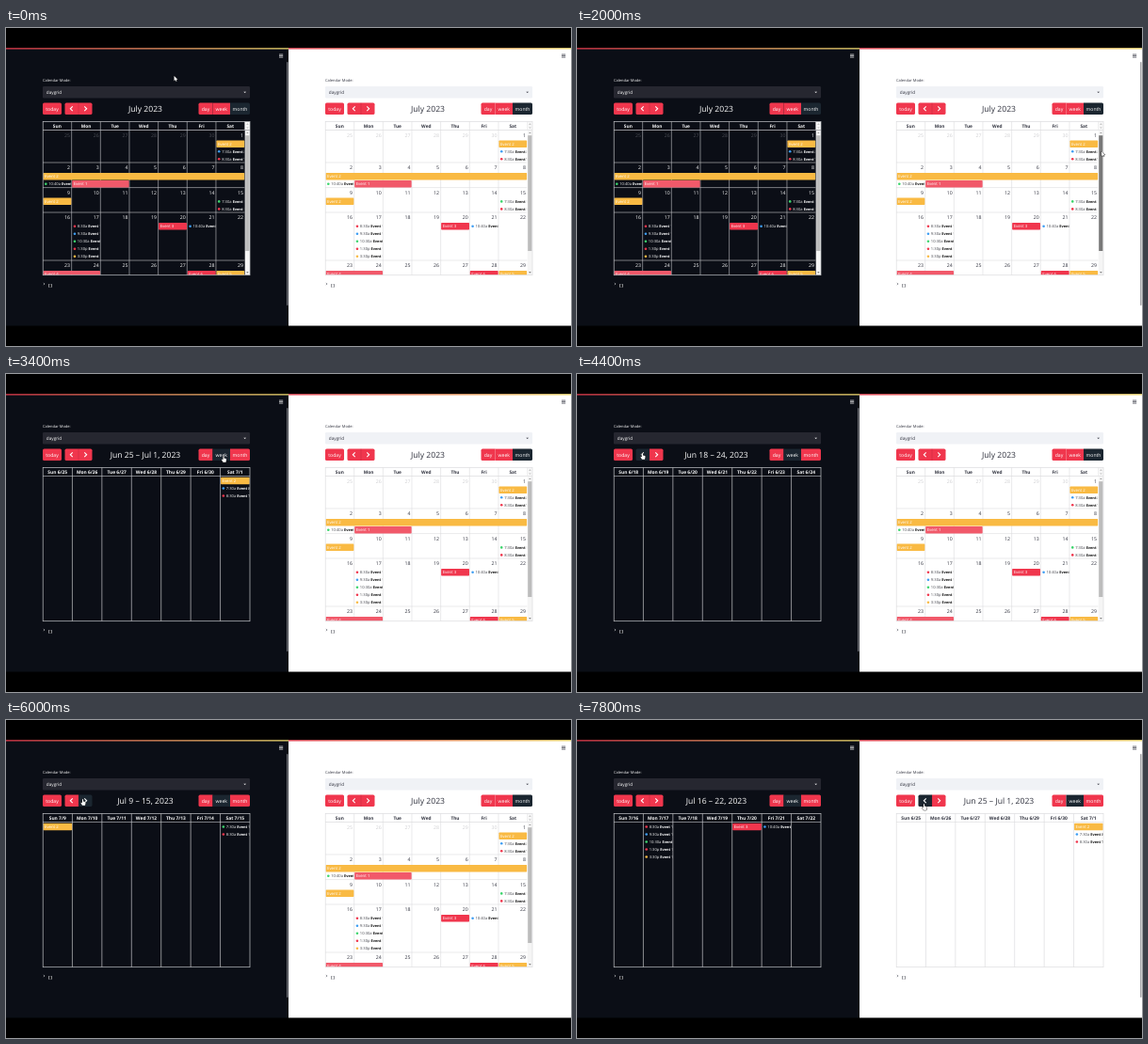
Write an HTML page with a canvas that moves like this. It is 600 px wide and 338 px high and loops after 8000 ms.

```html
<!DOCTYPE html>
<html lang="en">
<head>
<meta charset="utf-8">
<title>Calendar in two themes</title>
<style>
html, body { margin: 0; width: 100%; height: 100%; overflow: hidden; background: #000; }
canvas { display: block; width: 600px; height: 338px; }
</style>
</head>
<body>
<canvas id="stage"></canvas>
<script>
const LOOP = 8000, STEP = 200;
const canvas = document.getElementById('stage');
const dpr = window.devicePixelRatio || 1;
canvas.width = 600 * dpr;
canvas.height = 338 * dpr;
const ctx = canvas.getContext('2d');
ctx.scale(dpr, dpr);
ctx.textRendering = 'geometricPrecision';

const SANS = '"Open Sans", "Noto Sans", sans-serif';
const MONO = '"Noto Sans Mono", monospace';
const RED = '#f0364d', PINK = '#f1596a', GOLD = '#f9ba43';
const BLUE = '#3d9df3', GREEN = '#3dd56d', NAVY = '#1b2630';
const THEMES = [
  { bg: '#0b0e16', text: '#fafafa', time: '#f0f0f0', dim: '#4b4d54', line: '#c4c5c8', field: '#262730', bar: '#6c6e73' },
  { bg: '#fff', text: '#31333f', time: '#45464d', dim: '#cfcfd2', line: '#dcdcde', field: '#f0f2f6', bar: '#a9a9ac' }
];

// Events by week, counted from June 25; bars: slot, first day, days, colour, number.
const BARS = [
  [[0, 6, 1, GOLD, 2]],
  [[0, 0, 7, GOLD, 2], [1, 1, 2, PINK, 1]],
  [[0, 0, 1, GOLD, 2]],
  [[0, 4, 1, RED, 3]],
  [[0, 0, 2, PINK, 4], [0, 5, 1, RED, 6], [0, 6, 1, GOLD, 5]],
  []
];
// Timed entries: slot, day, colour, time, number.
const TIMED = [
  [[1, 6, BLUE, '7:30a', 8], [2, 6, RED, '8:30a', 7]],
  [[1, 0, GREEN, '10:40a', 9]],
  [[0, 6, GREEN, '7:30a', 10], [1, 6, RED, '8:30a', 11]],
  [[0, 1, RED, '8:30a', 12], [1, 1, BLUE, '9:30a', 13], [2, 1, GREEN, '10:30a', 14],
   [3, 1, RED, '1:30p', 15], [4, 1, GOLD, '3:30p', 16], [0, 5, BLUE, '10:40a', 17]],
  [], []
];
const ROWS = [108.5, 143, 169.6, 196, 247, 273.5, 290];
const DAYS = ['Sun', 'Mon', 'Tue', 'Wed', 'Thu', 'Fri', 'Sat'];
const BUTTONS = {
  today: [39, 20], prev: [62.5, 14.5], next: [77, 14.5],
  day: [204.5, 15], week: [219.5, 18.5], month: [238, 21]
};

// Time, x, y of the pointer's hot spot.
const POINTER = [
  [0, 178.6, 51], [1000, 257, 117], [1200, 257, 126], [1400, 257, 137], [1600, 257, 117],
  [1800, 330, 112], [2000, 557, 131], [2200, 558, 151], [2600, 559.5, 131],
  [2800, 450, 112], [3200, 231, 87], [3600, 231, 87], [4000, 69.5, 84], [4800, 69.5, 84],
  [5000, 81.5, 84], [6200, 81.5, 84], [6800, 528, 87], [7200, 528, 87], [7800, 368.5, 89]
];
// Week shown from each time on; null is the month.
const VIEWS = [
  [[0, null], [3400, 0], [4400, -1], [5400, 0], [5600, 1], [5800, 2], [6200, 3]],
  [[0, null], [7000, 0]]
];
const DRAGS = [[1000, 1600, 117], [2000, 2600, 131]];

const clamp = (v, a, b) => Math.min(b, Math.max(a, v));
const dateOf = (week, day) => new Date(Date.UTC(2023, 5, 25 + week * 7 + day));

function pointerAt(t) {
  const i = POINTER.findLastIndex(p => p[0] <= t);
  const a = POINTER[i], b = POINTER[i + 1] || a;
  const k = b === a ? 0 : (t - a[0]) / (b[0] - a[0]);
  const e = k * k * (3 - 2 * k);
  return [a[1] + (b[1] - a[1]) * e, a[2] + (b[2] - a[2]) * e];
}

function rect(x, y, w, h, fill, r = 0) {
  ctx.fillStyle = fill;
  ctx.beginPath();
  ctx.roundRect(x, y, w, h, r);
  ctx.fill();
}

function line(color, width, ...pts) {
  ctx.strokeStyle = color;
  ctx.lineWidth = width;
  ctx.beginPath();
  pts.forEach(([x, y]) => ctx.lineTo(x, y));
  ctx.stroke();
}

function text(s, x, y, size, color, { weight = 400, align = 'left', family = SANS } = {}) {
  ctx.font = `${weight} ${size}px ${family}`;
  ctx.textAlign = align;
  ctx.fillStyle = color;
  ctx.fillText(s, x, y);
  return ctx.measureText(s).width;
}

function clipped(x, y, w, h, draw) {
  ctx.save();
  ctx.beginPath();
  ctx.rect(x, y, w, h);
  ctx.clip();
  draw();
  ctx.restore();
}

function triangle(x, y, dir, color, s = 1.3) {
  ctx.fillStyle = color;
  ctx.beginPath();
  ctx.moveTo(x - s, y - dir * s / 2);
  ctx.lineTo(x + s, y - dir * s / 2);
  ctx.lineTo(x, y + dir * s / 2);
  ctx.fill();
}

function drawEvents(theme, week, top, colW) {
  for (const [slot, day, span, color, n] of BARS[week] || []) {
    const x = 39 + day * colW, y = top + slot * 8;
    rect(x + 0.5, y, colW * span - 0.8, 7.5, color, 0.8);
    text('Event ' + n, x + 2, y + 5.3, 4.3, '#fff');
  }
  for (const [slot, day, color, time, n] of TIMED[week] || []) {
    const x = 39 + day * colW, y = top + slot * 8 + 3.8;
    clipped(x, y - 4, colW - 0.5, 8, () => {
      rect(x + 2, y - 1.3, 2.6, 2.6, color, 1.3);
      const w = text(time, x + 6.2, y + 1.5, 4.1, theme.time);
      text('Event ' + n, x + 7.3 + w, y + 1.5, 3.9, theme.text === '#fafafa' ? '#fff' : '#111', { weight: 700 });
    });
  }
}

function drawScrollbar(offset, active) {
  rect(253.7, 99.7, 5.3, 8.6, '#f8f8f8');
  triangle(256.4, 102, -1, '#b5b5b5');
  triangle(256.4, 106.2, 1, '#b5b5b5');
  rect(253.7, 108.8, 5.3, 153.7, '#f5f5f5');
  triangle(256.4, 111.3, -1, '#999');
  triangle(256.4, 259.8, 1, '#555');
  rect(254.2, 114.2 + offset, 4.3, 122.8, active ? '#787878' : '#bcbcbc');
}

function drawMonth(theme, offset, active) {
  const colW = 214.6 / 7;
  DAYS.forEach((d, i) => text(d, 39 + (i + 0.5) * colW, 105.9, 4.8, theme.text, { weight: 700, align: 'center' }));
  clipped(39, 108.5, 214.6, 154, () => {
    ctx.translate(0, -offset * 1.35);
    for (let w = 0; w < 6; w++) {
      line(theme.line, 0.6, [39, ROWS[w]], [253.6, ROWS[w]]);
      for (let d = 0; d < 7; d++) {
        const date = dateOf(w, d);
        text(date.getUTCDate(), 39 + (d + 1) * colW - 1.6, ROWS[w] + 7.4, 5.2,
          date.getUTCMonth() === 6 ? theme.text : theme.dim, { align: 'right' });
      }
    }
    for (let d = 1; d < 7; d++) line(theme.line, 0.6, [39 + d * colW, 108], [39 + d * colW, 290]);
    for (let w = 0; w < 6; w++) drawEvents(theme, w, ROWS[w] + 11, colW);
  });
  for (let d = 1; d < 8; d++) line(theme.line, 0.6, [39 + d * colW, 99.5], [39 + d * colW, 108.5]);
  drawScrollbar(offset, active);
}

function drawWeek(theme, week) {
  const colW = 220 / 7;
  DAYS.forEach((d, i) => {
    const date = dateOf(week, i);
    text(`${d} ${date.getUTCMonth() + 1}/${date.getUTCDate()}`, 39 + (i + 0.5) * colW, 105.9, 4.9,
      theme.text, { weight: 700, align: 'center' });
    if (i) line(theme.line, 0.7, [39 + i * colW, 99.5], [39 + i * colW, 262.7]);
  });
  drawEvents(theme, week, 109.7, colW);
}

function titleOf(week) {
  if (week === null) return 'July 2023';
  const a = dateOf(week, 0), b = dateOf(week, 6);
  const name = d => d.getUTCMonth() === 5 ? 'Jun ' : 'Jul ';
  const end = (a.getUTCMonth() === b.getUTCMonth() ? '' : name(b)) + b.getUTCDate();
  return `${name(a)}${a.getUTCDate()} – ${end}, 2023`;
}

const hit = (name, [x, y]) => {
  const [left, width] = BUTTONS[name];
  return x >= left && x < left + width && y >= 79.5 && y < 92;
};

function drawButtons(week, pointer) {
  const round = { today: 1.6, prev: [1.6, 0, 0, 1.6], next: [0, 1.6, 1.6, 0],
    day: [1.6, 0, 0, 1.6], week: 0, month: [0, 1.6, 1.6, 0] };
  const current = week === null ? 'month' : 'week';
  for (const name in BUTTONS) {
    const [x, w] = BUTTONS[name], mid = x + w / 2;
    const dark = name === current || hit(name, pointer);
    rect(x, 79.6, w, 12.4, dark ? NAVY : RED, round[name]);
    if (name === 'prev' || name === 'next') {
      const s = name === 'prev' ? 1 : -1;
      line('#fff', 1.1, [mid + s, 83.4], [mid - s * 1.4, 85.8], [mid + s, 88.2]);
    } else {
      text(name, mid, 87.5, 5.1, '#fff', { align: 'center' });
    }
  }
  line('rgba(120,20,40,.45)', 0.4, [77, 79.6], [77, 92]);
}

function drawPanel(index, t, cursor) {
  const theme = THEMES[index];
  const pointer = [cursor[0] - index * 300, cursor[1]];
  const week = VIEWS[index].findLast(v => v[0] <= t)[1];
  const [from, to, grip] = DRAGS[index];
  const active = t >= from && t <= to;
  const offset = active ? clamp(pointer[1] - grip, 0, 20) : 0;

  ctx.save();
  ctx.translate(index * 300, 0);
  rect(0, 21.5, 300, 295, theme.bg);
  const glow = ctx.createLinearGradient(0, 0, 300, 0);
  glow.addColorStop(0, '#e8394c');
  glow.addColorStop(1, '#f5e070');
  rect(0, 21.3, 300, 1.2, glow);
  for (let i = 0; i < 3; i++) line(theme.text, 0.7, [290, 28.1 + i * 1.5], [294.2, 28.1 + i * 1.5]);
  if (pointer[0] >= 0 && pointer[0] < 300) rect(298, 36, 1.6, 259, theme.bar, 0.8);

  text('Calendar Mode:', 39, 57, 4, theme.text);
  rect(39, 62, 220, 12.5, theme.field, 1.2);
  text('daygrid', 42.8, 69.8, 4.7, theme.text);
  triangle(253.7, 68.4, 1, theme.text, 1.4);
  drawButtons(week, pointer);
  text(titleOf(week), 148, 89.2, 8.6, theme.text, { weight: 500, align: 'center' });

  if (week === null) drawMonth(theme, offset, active);
  else drawWeek(theme, week);
  line(theme.line, 0.6, [39, 108.5], [259, 108.5]);
  ctx.strokeStyle = theme.line;
  ctx.lineWidth = 0.7;
  ctx.strokeRect(39.2, 99.5, 219.8, 163.2);

  line(theme.text, 0.5, [39.8, 271], [41.1, 272], [39.8, 273]);
  text('[]', 44.6, 274.9, 4.1, theme.text, { family: MONO, weight: 600 });
  ctx.restore();
}

const ARROW = new Path2D('M0 0V5.2L1.2 4.1L2 5.8L2.8 5.4L2.1 3.8H3.7Z');
const HAND = new Path2D('M-.5 .4Q0-.3 .5 .4V2.4L2.6 3Q3.2 3.3 3 4.2L2.5 6.8H-.5L-2 4.3Q-2 3.5-1.2 3.8L-.5 4.3Z');

function drawCursor([x, y]) {
  const local = [x % 300, y];
  const shape = Object.keys(BUTTONS).some(name => hit(name, local)) ? HAND : ARROW;
  ctx.save();
  ctx.translate(x, y);
  ctx.lineWidth = 0.9;
  ctx.strokeStyle = '#222';
  ctx.stroke(shape);
  ctx.fillStyle = '#fff';
  ctx.fill(shape);
  ctx.restore();
}

function render(now) {
  const t = Math.floor((now % LOOP) / STEP) * STEP;
  const cursor = pointerAt(t);
  rect(0, 0, 600, 338, '#000');
  drawPanel(0, t, cursor);
  drawPanel(1, t, cursor);
  drawCursor(cursor);
}

function tick() {
  render(performance.now());
  requestAnimationFrame(tick);
}
tick();
</script>
</body>
</html>
```
